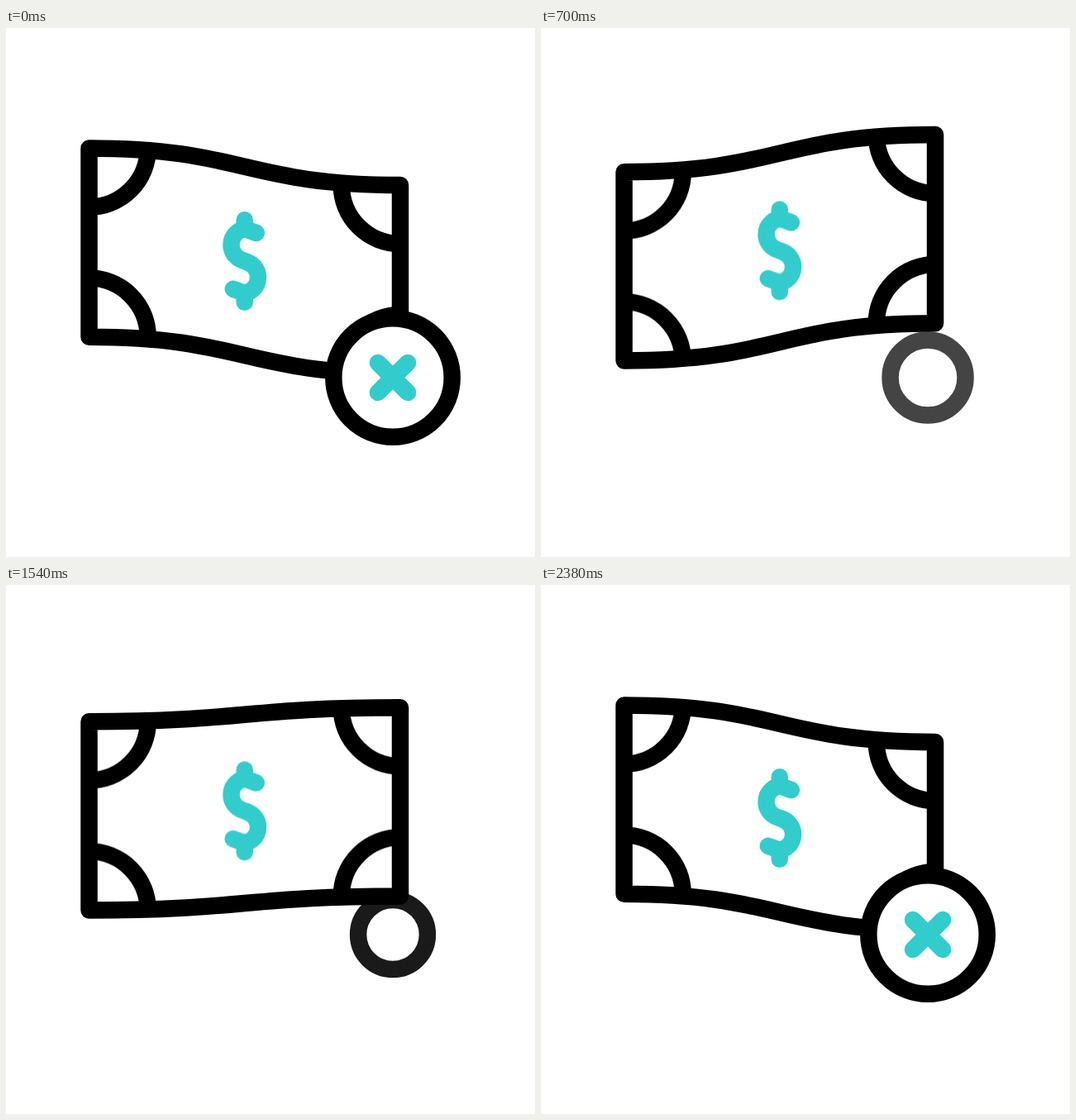
Recreate the animation shown at these times as an HTML page. Size 640 by 640 pixels, loop 2400 ms.

```html
<!DOCTYPE html>
<html lang="en">
<head>
<meta charset="utf-8">
<title>Banknote</title>
<style>
  html, body { margin: 0; width: 100%; height: 100%; overflow: hidden; background: #fff; }
  svg { display: block; width: 100vw; height: 100vh; }
  svg { fill: none; stroke: #000; stroke-width: 20.5; stroke-linejoin: round; }
  .teal { stroke: #3cc; stroke-linecap: round; }

  .note, .left, .right, .dollar {
    animation: .6s cubic-bezier(.6, 0, .4, 1) infinite alternate;
  }
  .note { animation-name: wave; }
  .left { animation-name: sink; }
  .right { animation-name: lift; }
  .dollar { animation-name: bob; }

  .badge, .ring, .cross {
    animation: 2.4s cubic-bezier(.333, 0, .667, 1) infinite;
  }
  .badge { animation-name: fade; }
  .ring { animation-name: pulse; fill: #fff; }
  .cross { animation-name: pop; transform-origin: 468px 423px; }

  @keyframes wave {
    from { d: path("M100.5 145.5C288.75 145.5 288.75 190 477 190V418.3C288.75 418.3 288.75 373.8 100.5 373.8Z"); }
    to { d: path("M100.5 175.2C288.75 175.2 288.75 127 477 127V355.3C288.75 355.3 288.75 403.5 100.5 403.5Z"); }
  }
  @keyframes sink { to { transform: translateY(29.7px); } }
  @keyframes lift { to { transform: translateY(-63px); } }
  @keyframes bob { to { transform: translateY(-13.1px); } }

  @keyframes fade {
    0%, 25% { opacity: 1; }
    37.5%, 54.167% { opacity: 0; }
    66.667%, 100% { opacity: 1; }
  }
  @keyframes pulse {
    0% { r: 71.7px; }
    18.333% { r: 94.3px; }
    39.583%, 54.583% { r: 0px; }
    74.583% { r: 88.8px; }
    91.667%, 100% { r: 71.7px; }
  }
  @keyframes pop {
    0% { transform: scale(1); }
    12.5%, 79.167% { transform: scale(0); }
    91.667%, 100% { transform: scale(1); }
  }
</style>
</head>
<body>
<svg viewBox="0 0 640 640">
  <path class="note" d="M100.5 145.5C288.75 145.5 288.75 190 477 190V418.3C288.75 418.3 288.75 373.8 100.5 373.8Z"/>
  <path class="left" d="M171.7 145.5A71.2 71.2 0 0 1 100.5 216.7M171.7 373.8A71.2 71.2 0 0 0 100.5 302.6"/>
  <path class="right" d="M405.8 190A71.2 71.2 0 0 0 477 261.2M405.8 418.3A71.2 71.2 0 0 1 477 347.1"/>
  <path class="teal dollar" d="M288.7 232.3V243M288.7 331.7V321M302.8 248L293.5 244.6C283.5 241 272.5 250 272.5 262.5C272.5 271 278 278 286 281L291.5 283C299.5 286 305 293 305 301.5C305 314 294 322.8 284.1 319.2L274.8 315.8"/>
  <g class="badge">
    <circle class="ring" cx="468" cy="423" r="71.7"/>
    <path class="teal cross" d="M449.9 405L486.1 441M486.1 405L449.9 441"/>
  </g>
</svg>
</body>
</html>
```
